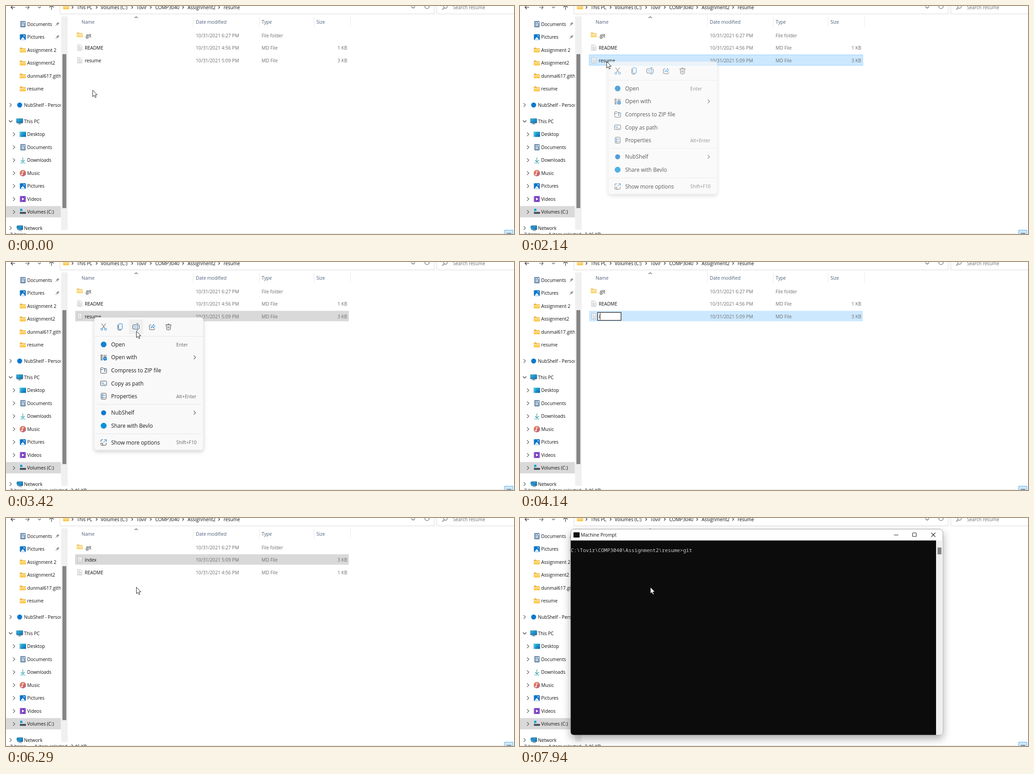
An HTML page that plays this animation: 1116x502 px, repeating every 8 s.

```html
<!DOCTYPE html>
<html lang="en">
<head>
<meta charset="utf-8">
<title>Renaming a file</title>
<style>
html, body { margin: 0; width: 100%; height: 100%; overflow: hidden; background: #fff; }
svg { display: block; width: 100%; height: 100%; }
text { font: 10.2px "Open Sans", "Noto Sans", sans-serif; fill: #111; }
.head text { fill: #4c607a; }
.grey { fill: #6d6d6d; }
.end { text-anchor: end; }
.line { fill: none; stroke: #5c5c5c; stroke-width: 1.1; }
.dark { stroke: #222; }
.blue { stroke: #0a78d0; }
.menu text { font-size: 11.85px; fill: #1b1b1b; }
.menu .key { font-size: 10.3px; fill: #666; }
.menu .line { stroke: #444; stroke-width: 1; }
.menu .blue { stroke: #0a78d0; }
.console text { font: 11.12px "Noto Sans Mono", "DejaVu Sans Mono", monospace; fill: #ccc; }
.console .title { font: 10.2px "Open Sans", "Noto Sans", sans-serif; fill: #111; }

/* Every change runs on the same 8 s clock: 1% = 80 ms. */
.a { animation: 8s step-end infinite; }
.off { visibility: hidden; }

#pointer { animation-name: pointer; animation-timing-function: linear; }
@keyframes pointer {
  0% { transform: translate(190px, 185px); }
  10% { transform: translate(190px, 185px); animation-timing-function: steps(8, start); }
  16.857% { transform: translate(190px, 122px); }
  33.375% { transform: translate(190px, 122px); animation-timing-function: steps(8, start); }
  40.23%, 100% { transform: translate(286px, 152px); }
}
#arrow { animation-name: arrow; }
@keyframes arrow { 51.75% { visibility: hidden; } 52.625% { visibility: visible; } }

#readme { animation-name: sortDown; }
#renamed { animation-name: sortUp; }
@keyframes sortDown { 0% { transform: none; } 68.5%, 100% { transform: translateY(27.7px); } }
@keyframes sortUp { 0% { transform: none; } 68.5%, 100% { transform: translateY(-27.7px); } }

#bar { animation-name: bar; }
@keyframes bar {
  0% { fill: #fff; stroke: transparent; }
  15.15% { fill: #e5f3ff; }
  20.125% { fill: #cce8ff; stroke: #99d1ff; }
  33.375% { fill: #d9d9d9; stroke: transparent; }
  43.625% { fill: #cce8ff; }
  70.875%, 100% { fill: #d9d9d9; stroke: transparent; }
}
#oldName { animation-name: oldName; }
@keyframes oldName { 43.625%, 100% { visibility: hidden; } }
#newName { animation-name: newName; }
@keyframes newName { 68.5%, 100% { visibility: visible; } }
#status { animation-name: status; }
@keyframes status { 20.125%, 100% { visibility: visible; } }

.menu { opacity: 0; animation-name: menu; }
@keyframes menu {
  26.75% { opacity: .72; } 27.625% { opacity: 1; }
  43.625% { opacity: .5; } 44.5% { opacity: .2; } 45.25%, 100% { opacity: 0; }
}
#hover { animation-name: hover; }
@keyframes hover {
  0% { transform: none; }
  34.24% { visibility: visible; }
  35.95% { transform: translateX(35.7px); }
  38.53%, 100% { transform: translateX(71.4px); }
  45.25%, 100% { visibility: hidden; }
}

#edit { animation-name: edit; }
@keyframes edit { 43.625% { visibility: visible; } 68.5%, 100% { visibility: hidden; } }
#marked { animation-name: marked; }
@keyframes marked { 43.625% { visibility: visible; } 51.75%, 100% { visibility: hidden; } }
#frame { animation-name: frame; }
@keyframes frame { 0% { width: 51.5px; } 58.5%, 100% { width: 58px; } }
.i { animation-name: i; } .n { animation-name: n; } .d { animation-name: d; }
.e { animation-name: e; } .x { animation-name: x; }
@keyframes i { 51.75% { visibility: visible; } 68.5%, 100% { visibility: hidden; } }
@keyframes n { 53.5% { visibility: visible; } 68.5%, 100% { visibility: hidden; } }
@keyframes d { 54.375% { visibility: visible; } 68.5%, 100% { visibility: hidden; } }
@keyframes e { 56.125% { visibility: visible; } 68.5%, 100% { visibility: hidden; } }
@keyframes x { 58.5% { visibility: visible; } 68.5%, 100% { visibility: hidden; } }
#caret { animation-name: caret; }
@keyframes caret {
  51.75% { visibility: visible; transform: translateX(2.6px); }
  53.5% { transform: translateX(8.8px); }
  54.375% { transform: translateX(15px); }
  56.125% { transform: translateX(20.8px); }
  58.5%, 100% { transform: translateX(26px); }
  65.125%, 100% { visibility: hidden; }
}

.console { animation-name: console; }
@keyframes console { 79.375%, 100% { visibility: visible; } }
.g { animation-name: g; } .it { animation-name: it; }
@keyframes g { 95.125%, 100% { visibility: visible; } }
@keyframes it { 96.5%, 100% { visibility: visible; } }
#blink { animation-name: blink; }
@keyframes blink {
  0% { transform: none; }
  86% { visibility: visible; }
  92.625% { visibility: hidden; }
  95.125% { visibility: visible; transform: translateX(6.67px); }
  96.5% { transform: translateX(20px); }
  97.875%, 100% { transform: translateX(26.7px); }
  99.25%, 100% { visibility: hidden; }
}
</style>
</head>
<body>
<svg viewBox="0 0 1116 502">
<defs>
  <clipPath id="side"><rect width="120.5" height="502"/></clipPath>
  <linearGradient id="gold" x2="0" y2="1"><stop stop-color="#ffe29a"/><stop offset="1" stop-color="#f9c53f"/></linearGradient>
  <linearGradient id="sea" x2="1" y2="1"><stop stop-color="#31c1e0"/><stop offset="1" stop-color="#0b66b5"/></linearGradient>
  <linearGradient id="warm" x2="1" y2="1"><stop stop-color="#ef8a4c"/><stop offset="1" stop-color="#b25a86"/></linearGradient>
  <filter id="soft" x="-10%" y="-10%" width="120%" height="125%"><feDropShadow dx="0" dy="4" stdDeviation="4" flood-opacity=".17"/></filter>
  <filter id="deep" x="-10%" y="-10%" width="120%" height="125%"><feDropShadow dx="0" dy="8" stdDeviation="9" flood-opacity=".33"/></filter>
  <!-- Icons are centred on the origin. -->
  <g id="next"><path class="line" d="M-2-4 2 0-2 4"/></g>
  <g id="crumb"><path class="line dark" d="M-1.4-2.8 1.4 0-1.4 2.8"/></g>
  <g id="folder"><path d="M-6.5-4.2q0-1 1-1h3.5l1.5 1.5h6q1 0 1 1V4q0 1-1 1h-11q-1 0-1-1z" fill="#e9ac2c"/><rect x="-6.5" y="-2.6" width="13" height="7.8" rx="1" fill="url(#gold)"/></g>
  <g id="docs"><rect x="-5.5" y="-7" width="11.5" height="14" rx="1.2" fill="#6f8fb0"/><path d="M-3-3.5H1M-3 0H3.5M-3 3H3.5" stroke="#fff" stroke-width="1.3"/><path d="M2-5h2.5v3H2z" fill="#d6e5f2"/></g>
  <g id="pics"><rect x="-6.5" y="-6.2" width="13" height="12.4" rx="1.3" fill="#0f74c9"/><path d="M-5 5.8-.3-.2 5 5.8z" fill="#fff"/><circle cx="2.8" cy="-2.8" r="1.2" fill="#fff"/></g>
  <g id="pc"><rect x="-7" y="-6" width="14" height="9.5" rx=".8" fill="url(#sea)" stroke="#31536c" stroke-width=".7"/><path d="M-3.5 5.5h7M0 3.5v2" stroke="#53798f" stroke-width="1.4"/></g>
  <g id="desk"><rect x="-7" y="-5.7" width="14" height="11.4" rx="1" fill="url(#sea)"/><path d="M-4.8-3v1.2M-4.8 0v1.2M-4.8 3v1.2" stroke="#fff" stroke-width="1.3"/></g>
  <g id="down" fill="none" stroke="#269aad" stroke-width="1.2"><path d="M0-6V3.5M-4 0 0 4 4 0M-5.5 6h11"/></g>
  <g id="music"><circle r="7" fill="url(#warm)"/><path d="M-.7 3V-3.6l3 1" fill="none" stroke="#fff" stroke-width="1.2"/><circle cx="-2" cy="3" r="1.6" fill="#fff"/></g>
  <g id="video"><rect x="-6.5" y="-6.5" width="13" height="13" rx="1.2" fill="#7b3fc4"/><path d="M-1.8-3.2 3.2 0-1.8 3.2z" fill="#fff"/><path d="M-5-5V6M5-5V6" stroke="#c39af0" stroke-dasharray="1.3 1.5"/></g>
  <g id="drive"><rect x="-6.5" y="0" width="13.5" height="4" rx=".7" fill="#3f4a52"/><rect x="-6" y="-7" width="5" height="5" fill="#189fdc"/></g>
  <g id="net"><rect x="-5" y="-5.5" width="12" height="9" rx=".8" fill="url(#sea)" stroke="#31536c" stroke-width=".7"/><circle cx="-3" cy="-2" r="4" fill="#3296c9"/><path d="M-6-3q3 2 6 0M-2 5.5h7" fill="none" stroke="#2d5f78"/></g>
  <g id="page"><path d="M-4.6-6h6.5l2.8 2.8V6h-9.3z" fill="#fff" stroke="#a4a9ad" stroke-width=".8"/><path d="M-2.8-2.8H1M-2.8-.6H3M-2.8 1.6H3M-2.8 3.8H3" stroke="#9ba9b5" stroke-width=".8"/></g>
  <g id="pin" transform="rotate(45)"><path d="M-2.2-4.5h4.4l-.6 1v2.7L3.2.8H-3.2L-1.6-.8v-2.7zM-.5.8h1v4.2h-1z" fill="#8b8f93"/></g>
</defs>
<rect width="1116" height="502" fill="#fff"/>

<!-- Address bar -->
<g fill="none" stroke="#d9d9d9"><path d="M118.5 0V17.5H940.5V0M946.5 0V17.5H1116"/></g>
<path class="line dark" d="M20 3H11.5M15-1 11 3l4 4M95.500 3 100-1.500 104.500 3M100-1V8.500"/>
<path class="line" d="M42 3h8.500M47-1l4 4-4 4M70.500 1.500 73.500 4.500 76.500 1.500M890.500 1 894.500 5 898.500 1M920.200 0a4.800 4.800 0 1 0 9.400 0M958.500 8l4-4"/>
<circle class="line" cx="965.500" cy="1" r="4"/>
<use href="#folder" x="132" y="2"/>
<g>
  <use href="#crumb" x="146" y="3"/><text x="155.500" y="6.700">This PC</text>
  <use href="#crumb" x="199" y="3"/><text x="208" y="6.700">Volumes (C:)</text>
  <use href="#crumb" x="277" y="3"/><text x="286.500" y="6.700">Tovir</text>
  <use href="#crumb" x="318" y="3"/><text x="328" y="6.700">COMP3040</text>
  <use href="#crumb" x="389" y="3"/><text x="399" y="6.700">Assignment2</text>
  <use href="#crumb" x="468" y="3"/><text x="478" y="6.700">resume</text>
  <text x="982" y="6.700" class="grey">Search resume</text>
</g>

<!-- Sidebar -->
<rect y="440.500" width="120.500" height="25" fill="#d9d9d9"/>
<g clip-path="url(#side)">
  <g transform="translate(37 40)"><use href="#docs"/><text x="9.500" y="3.700">Documents</text><use href="#pin" x="53" y="-53"/></g>
  <g transform="translate(37 68.500)"><use href="#pics"/><text x="9.500" y="3.700">Pictures</text></g>
  <g transform="translate(37 97)"><use href="#folder"/><text x="9.500" y="3.700">Assignment 2</text></g>
  <g transform="translate(37 125.500)"><use href="#folder"/><text x="9.500" y="3.700">Assignment2</text></g>
  <g transform="translate(37 154)"><use href="#folder"/><text x="9.500" y="3.700">dunmal617.github.io</text></g>
  <g transform="translate(37 182.500)"><use href="#folder"/><text x="9.500" y="3.700">resume</text></g>
  <g transform="translate(30 218)"><use href="#next" x="-20"/><circle r="5.500" fill="#0f78d0"/><text x="9.500" y="3.700">NubShelf - Personal</text></g>
  <g transform="translate(30 254)"><path class="line dark" d="M-23.500-2-19.800 1.800-16-2"/><use href="#pc"/><text x="9.500" y="3.700">This PC</text></g>
  <g transform="translate(37 282.500)"><use href="#next" x="-19.500"/><use href="#desk"/><text x="9.500" y="3.700">Desktop</text></g>
  <g transform="translate(37 311)"><use href="#next" x="-19.500"/><use href="#docs"/><text x="9.500" y="3.700">Documents</text></g>
  <g transform="translate(37 339.500)"><use href="#next" x="-19.500"/><use href="#down"/><text x="9.500" y="3.700">Downloads</text></g>
  <g transform="translate(37 368)"><use href="#next" x="-19.500"/><use href="#music"/><text x="9.500" y="3.700">Music</text></g>
  <g transform="translate(37 396.500)"><use href="#next" x="-19.500"/><use href="#pics"/><text x="9.500" y="3.700">Pictures</text></g>
  <g transform="translate(37 425)"><use href="#next" x="-19.500"/><use href="#video"/><text x="9.500" y="3.700">Videos</text></g>
  <g transform="translate(37 453.500)"><use href="#next" x="-19.500"/><use href="#drive"/><text x="9.500" y="3.700">Volumes (C:)</text></g>
  <g transform="translate(30 489)"><use href="#next" x="-20"/><use href="#net"/><text x="9.500" y="3.700">Network</text></g>
</g>
<g transform="translate(112.500 40)"><use href="#pin"/></g>
<g transform="translate(112.500 68.500)"><use href="#pin"/></g>
<rect x="121" y="23" width="14.500" height="470" fill="#f0f0f0"/>
<rect x="124" y="106" width="8.500" height="339" fill="#858585"/>

<!-- File list -->
<path d="M411.500 24V46M556.500 24V46M676.500 24V46M756.500 24V46" stroke="#e8e8e8"/>
<path class="line" d="M282.500 26.500 286 23.500 289.500 26.500" stroke-width=".8"/>
<g class="head">
  <text x="166" y="39.200">Name</text><text x="417" y="39.200">Date modified</text>
  <text x="561.500" y="39.200">Type</text><text x="682" y="39.200">Size</text>
</g>
<g>
  <use href="#folder" x="162" y="63.500" opacity=".75"/><text x="173" y="68.700">.git</text>
  <text x="417" y="68.700" class="grey">10/31/2021 6:27 PM</text><text x="561.500" y="68.700" class="grey">File folder</text>
</g>
<g id="renamed" class="a">
  <rect id="bar" class="a" x="152" y="107.500" width="601" height="23"/>
  <use href="#page" x="162" y="119.500"/>
  <text id="oldName" class="a" x="173" y="123.800">resume</text>
  <text id="newName" class="a off" x="173" y="123.800">index</text>
  <text x="417" y="123.800" class="grey">10/31/2021 5:09 PM</text><text x="561.500" y="123.800" class="grey">MD File</text>
  <text x="749.500" y="123.800" class="grey end">3 KB</text>
</g>
<g id="readme" class="a">
  <use href="#page" x="162" y="91.800"/><text x="173" y="96.100">README</text>
  <text x="417" y="96.100" class="grey">10/31/2021 4:56 PM</text><text x="561.500" y="96.100" class="grey">MD File</text>
  <text x="749.500" y="96.100" class="grey end">1 KB</text>
</g>
<g id="edit" class="a off">
  <rect id="frame" class="a" x="170.500" y="111" width="51.500" height="17.500" fill="#fff" stroke="#111" stroke-width="1.200"/>
  <g id="marked" class="a off"><rect x="173" y="112.500" width="36" height="14.500" fill="#0078d7"/><text x="173" y="123.800" style="fill:#fff">resume</text></g>
  <text x="173" y="123.800"><tspan class="a off i">i</tspan><tspan class="a off n">n</tspan><tspan class="a off d">d</tspan><tspan class="a off e">e</tspan><tspan class="a off x">x</tspan></text>
  <rect id="caret" class="a off" x="173" y="112" width="1" height="15" fill="#111"/>
</g>

<!-- Status bar -->
<path d="M0 501.500H1116" stroke="#e3e3e3"/>
<text x="9" y="506.500">3 items</text>
<g id="status" class="a off"><text x="63" y="506.500">1 item selected</text><text x="142" y="506.500">2.46 KB</text></g>
<rect x="1095.500" y="493.500" width="18" height="14" fill="#cce8ff" stroke="#5db2e6"/>
<path d="M1100 500.500h10" stroke="#333"/>

<!-- Context menu -->
<g class="menu a">
  <rect x="194" y="122" width="239.500" height="292" rx="6" fill="#f9f9f9" stroke="#e2e2e2" stroke-width=".7" filter="url(#soft)"/>
  <rect id="hover" class="a off" x="199" y="127" width="31" height="32" rx="3" fill="#f0f0f0"/>
  <path d="M194.500 163.500H433M197 313.500H430M197 378.500H430" stroke="#e5e5e5"/>
  <path class="line" d="M210 135.500 217 146M219 135.500 212 146"/>
  <path class="line blue" d="M208.200 148a2.200 2.200 0 1 0 4.400 0a2.200 2.200 0 1 0-4.400 0M216.400 148a2.200 2.200 0 1 0 4.400 0a2.200 2.200 0 1 0-4.400 0"/>
  <path class="line" d="M245.500 138v9.500q0 2.500 2.500 2.500h5"/>
  <rect class="line blue" x="247.500" y="136" width="8" height="12" rx="1.700"/>
  <path class="line" d="M287 138.500h-7q-1.500 0-1.500 1.500v6q0 1.500 1.500 1.500h7M290 138.500h1q1.500 0 1.500 1.500v6q0 1.500-1.500 1.500h-1"/>
  <path class="line blue" d="M286.500 135.500h4M286.500 150h4M288.500 135.500V150M281 143h5" stroke-width="1.300"/>
  <path class="line" d="M319 138.500h-2.500q-1.500 0-1.500 1.500v7.500q0 1.500 1.500 1.500h8.500q1.500 0 1.500-1.500V146"/>
  <path class="line blue" d="M318.500 145.500q.5-5 5-5v-3.500l4 4.500-4 4v-2.500q-3 0-5 2.500z"/>
  <path class="line" d="M350.500 138.500h13M352 138.500l1 9.500q.2 1.500 1.500 1.500h5q1.300 0 1.500-1.500l1-9.500M355 138.500q0-2.500 2-2.500t2 2.500M355.700 141.500v5M358.300 141.500v5"/>

  <circle cx="214.500" cy="181.500" r="6.300" fill="#1682cc"/>
  <text x="231" y="185.800">Open</text><text class="key" x="374" y="185.500">Enter</text>
  <path class="line" d="M208.500 204.500h3v3h-3zM208.500 209.500h3v3h-3zM208.500 214.500h3v1.500h-3zM214 205.500h7M214 208.500h7"/>
  <circle cx="217.500" cy="213" r="4" fill="#0a78d0"/><path d="M217.500 215.500v-4.500M215.700 212.500l1.800-1.800 1.800 1.800" fill="none" stroke="#fff" stroke-width=".8"/>
  <text x="231" y="214.300">Open with</text><use href="#next" x="414.500" y="210"/>
  <path class="line" d="M208 234q0-1.500 1.500-1.500h3l1.500 2h5.500q1.500 0 1.500 1.500v7.500q0 1.500-1.500 1.500h-10q-1.500 0-1.500-1.500zM208 236.500h5"/>
  <path class="line blue" d="M217 235v7M215.500 237h3M215.500 240h3"/>
  <text x="231" y="242.900">Compress to ZIP file</text>
  <rect class="line" x="207.500" y="262" width="13.500" height="10" rx="1.700"/><path class="line blue" d="M210 264.500l2 5.500M213 264.500l2 5.500M216.500 270h2"/>
  <text x="231" y="271.500">Copy as path</text>
  <rect class="line" x="209" y="289" width="11" height="13" rx="1.500"/><path class="line blue" d="M211 292h2.500v2.500H211zM211 297h2.500v2.500H211z"/><path class="line" d="M215.500 293.200h2.500M215.500 298.200h2.500"/>
  <text x="231" y="300">Properties</text><text class="key" x="374" y="299.500">Alt+Enter</text>
  <circle cx="214.500" cy="332" r="5.500" fill="#0f78d0"/>
  <text x="231" y="336.300">NubShelf</text><use href="#next" x="414.500" y="332"/>
  <circle cx="214.500" cy="360.500" r="6.500" fill="#0a93da"/>
  <text x="231" y="365">Share with Bevlo</text>
  <path class="line" d="M213 391.500h-3q-1.500 0-1.500 1.500v3M208.500 399v3q0 1.500 1.500 1.500h8.500q1.500 0 1.500-1.500v-4M208.500 399h4v4"/><path class="line blue" d="M214 397.500l6.500-6M216 391.200h4.700v4.700"/>
  <text x="231" y="401.700">Show more options</text><text class="key" x="374" y="401.200">Shift+F10</text>
</g>

<!-- Console window -->
<g class="console a off">
  <rect x="111.500" y="24.500" width="817.500" height="453" rx="7" fill="#fff" stroke="#8c8c8c" stroke-width=".8" filter="url(#deep)"/>
  <path d="M111.500 49.500H914V477.500H118.500q-7 0-7-7z" fill="#0c0c0c"/>
  <path d="M914 49.500h14.700V470.500q0 7-7 7H914z" fill="#f0f0f0"/>
  <rect x="917.300" y="65" width="8.500" height="15" fill="#858585"/>
  <rect x="117.500" y="31.500" width="13.500" height="11.500" fill="#111"/>
  <text class="title" x="133.500" y="40.900">Machine Prompt</text>
  <path class="line dark" d="M821.500 37.500h9.500M903.500 32.500l9 9M912.500 32.500l-9 9"/>
  <rect class="line dark" x="862.500" y="32.800" width="8" height="8" rx="1"/>
  <text x="111.500" y="75">C:\Tovir\COMP3040\Assignment2\resume&gt;<tspan class="a off g">g</tspan><tspan class="a off it">it</tspan></text>
  <rect id="blink" class="a off" x="359" y="75" width="6.700" height="2" fill="#ccc"/>
</g>

<g id="pointer" class="a">
  <path id="arrow" class="a" d="M.5.300V14.600L3.700 11.600 6 16.700 8.200 15.700 6 10.700H10.400z" fill="#fff" stroke="#111" stroke-width=".9"/>
</g>
</svg>
</body>
</html>
```
